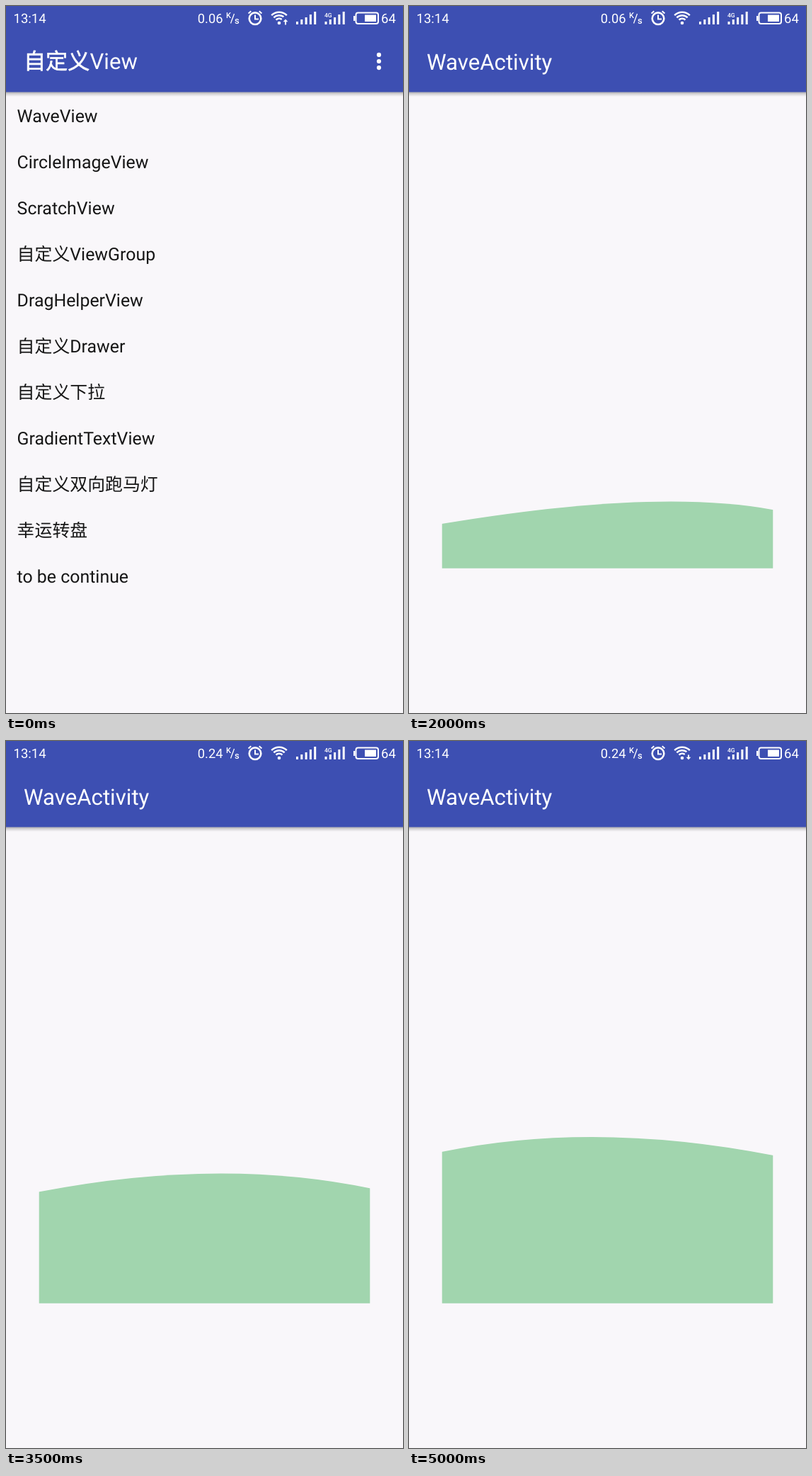
Write an HTML page with a canvas that moves like this. It is 561x998 px and loops after 5.1 s.

```html
<!DOCTYPE html>
<html lang="zh-CN">
<head>
<meta charset="utf-8">
<title>WaveView</title>
<style>
html, body { margin: 0; width: 100%; height: 100%; overflow: hidden; background: #f9f7fa; }
canvas { display: block; width: 561px; height: 998px; }
</style>
</head>
<body>
<canvas id="stage" width="561" height="998"></canvas>
<script>
const W = 561, H = 998, LOOP = 5100, BAR = 121.6;
const BLUE = '#3d4fb2', PAPER = '#f9f7fa', GREEN = '#a1d5ae';
const FONT = 'Roboto, "Noto Sans CJK SC", "Noto Sans CJK", sans-serif';
const ctx = document.getElementById('stage').getContext('2d');
ctx.textRendering = 'geometricPrecision';

const ITEMS = ['WaveView', 'CircleImageView', 'ScratchView', '自定义ViewGroup',
  'DragHelperView', '自定义Drawer', '自定义下拉', 'GradientTextView',
  '自定义双向跑马灯', '幸运转盘', 'to be continue'];

// The crest climbs after each turn of the control point.
const CREST = [[1200, 741], [1300, 732], [1480, 699.5], [2000, 699.5], [2100, 691],
  [2500, 657], [3000, 657], [3300, 617], [3400, 610.5], [3900, 610.5], [4250, 559]];
// Distance covered by the control point as it goes back and forth.
const TRAVEL = [[950, -130], [1300, 0], [2000, 388], [3000, 798], [3500, 1060],
  [4300, 1470], [5100, 1820]];
const SWING = { min: 72, span: 403 };
const BEND = 106;

function track(keys, t) {
  if (t <= keys[0][0]) return keys[0][1];
  for (let i = 1; i < keys.length; i++) {
    const [t0, a] = keys[i - 1], [t1, b] = keys[i];
    if (t < t1) return a + (b - a) * (t - t0) / (t1 - t0);
  }
  return keys[keys.length - 1][1];
}

function rect(x, y, w, h, color) {
  ctx.fillStyle = color;
  ctx.fillRect(x, y, w, h);
}

function text(str, x, y, size, color, weight = 400) {
  ctx.font = `${weight} ${size}px ${FONT}`;
  ctx.fillStyle = color;
  ctx.fillText(str, x, y);
}

function dot(x, y, r) {
  ctx.beginPath();
  ctx.arc(x, y, r, 0, Math.PI * 2);
  ctx.fill();
}

function line(...pts) {
  ctx.beginPath();
  for (let i = 0; i < pts.length; i += 2) ctx.lineTo(pts[i], pts[i + 1]);
  ctx.stroke();
}

function page(shadow) {
  rect(0, 0, W, H, PAPER);
  rect(0, 0, W, BAR, BLUE);
  if (!shadow) return;
  const g = ctx.createLinearGradient(0, BAR, 0, BAR + 6.4);
  g.addColorStop(0, 'rgba(0,0,0,.3)');
  g.addColorStop(.4, 'rgba(0,0,0,.14)');
  g.addColorStop(1, 'rgba(0,0,0,0)');
  rect(0, BAR, W, 6.4, g);
}

function listPage() {
  page(true);
  text('自定义', 24.9, 89, 31.2, '#fff');
  ctx.strokeStyle = '#fff';
  ctx.lineWidth = .6;
  ctx.strokeText('自定义', 24.9, 89);
  text('View', 118.5, 89, 31.2, '#fff');
  for (const y of [68.9, 78, 87.1]) dot(527, y, 3.1);
  ITEMS.forEach((s, i) => text(s, 15.6, 164 + 65 * i, 24.9, '#161616'));
}

function wave(t) {
  const d = track(TRAVEL, t), lap = SWING.span * 2;
  const m = ((d % lap) + lap) % lap;
  const cx = SWING.min + (m < SWING.span ? m : lap - m);
  const base = track(CREST, t) + BEND / 2;
  ctx.save();
  ctx.beginPath();
  ctx.rect(46.7, 200, 467.6, 593.7);
  ctx.clip();
  ctx.beginPath();
  ctx.moveTo(-70, base);
  ctx.quadraticCurveTo(cx, base - BEND, 631, base);
  ctx.lineTo(631, 800);
  ctx.lineTo(-70, 800);
  ctx.fillStyle = GREEN;
  ctx.fill();
  ctx.restore();
}

function wavePage(t, shift) {
  ctx.save();
  ctx.translate(shift, 0);
  page(shift < .5);
  text('WaveActivity', 24.9, 90, 31.2, '#fff');
  wave(t);
  ctx.restore();
}

function alarmIcon() {
  ctx.lineWidth = 2.6;
  ctx.beginPath();
  ctx.arc(352, 17.7, 8.3, 0, Math.PI * 2);
  ctx.stroke();
  ctx.lineWidth = 2;
  line(352, 12.5, 352, 18.5, 357, 18.5);
  line(342.6, 10.5, 346.3, 7.2);
  line(361.4, 10.5, 357.7, 7.2);
}

function wifiIcon(arrow) {
  ctx.lineWidth = 2.5;
  for (const r of [6.3, 10.8, 15.3]) {
    ctx.beginPath();
    ctx.arc(386, 24, r, -Math.PI * .75, -Math.PI * (arrow && r < 11 ? .3 : .25));
    ctx.stroke();
  }
  dot(386, 24, 2.3);
  if (!arrow) return;
  const tip = 22.5 - 4 * arrow, neck = 22.5 - .3 * arrow;
  ctx.beginPath();
  ctx.moveTo(395, tip);
  ctx.lineTo(398.4, neck);
  ctx.lineTo(391.6, neck);
  ctx.fill();
  rect(394, 19.5 + (arrow > 0 ? 2 : 0), 2, 5, '#fff');
}

function signalIcon(x) {
  [4, 7, 10, 14, 18].forEach((h, i) => rect(x + 6.3 * i, 26 - h, 3, h, '#fff'));
}

function batteryIcon() {
  ctx.lineWidth = 2;
  ctx.beginPath();
  ctx.roundRect(494.5, 9.5, 31.5, 15.5, 3);
  ctx.stroke();
  rect(491, 14, 2.5, 7, '#fff');
  rect(507, 12.5, 16, 9.5, '#fff');
}

function arrowAt(t) {
  if (t < 300 || (t >= 2800 && t < 3200)) return 1;
  return t >= 4800 ? -1 : 0;
}

function statusBar(t) {
  ctx.strokeStyle = '#fff';
  text('13:14', 10.5, 24, 18.5, '#fff');
  text(t < 2500 ? '0.06' : '0.24', 270.8, 24, 18.3, '#fff');
  text('K', 311, 17, 11, '#fff', 500);
  text('s', 323, 25, 13, '#fff', 500);
  ctx.lineWidth = 1.3;
  line(317.5, 24.5, 322.5, 11);
  alarmIcon();
  wifiIcon(arrowAt(t));
  signalIcon(410);
  signalIcon(450.5);
  text('4G', 450, 15.5, 8.5, '#fff', 500);
  batteryIcon();
  text('64', 530, 24, 18.5, '#fff');
}

function draw(t) {
  const u = Math.min(1, Math.max(0, (t - 940) / 500));
  const shift = W * (1 - u) ** 4;
  if (u < 1) {
    listPage();
    if (u > 0) rect(0, 0, W, H, `rgba(0,0,0,${.2 * (1 - shift / W)})`);
  }
  if (u > 0) wavePage(t, shift);
  statusBar(t);
}

// Time advances in steps of 100 ms.
const start = performance.now();
function tick() {
  const t = (performance.now() - start) % LOOP;
  draw(Math.floor(t / 100) * 100);
  requestAnimationFrame(tick);
}
tick();
</script>
</body>
</html>
```
